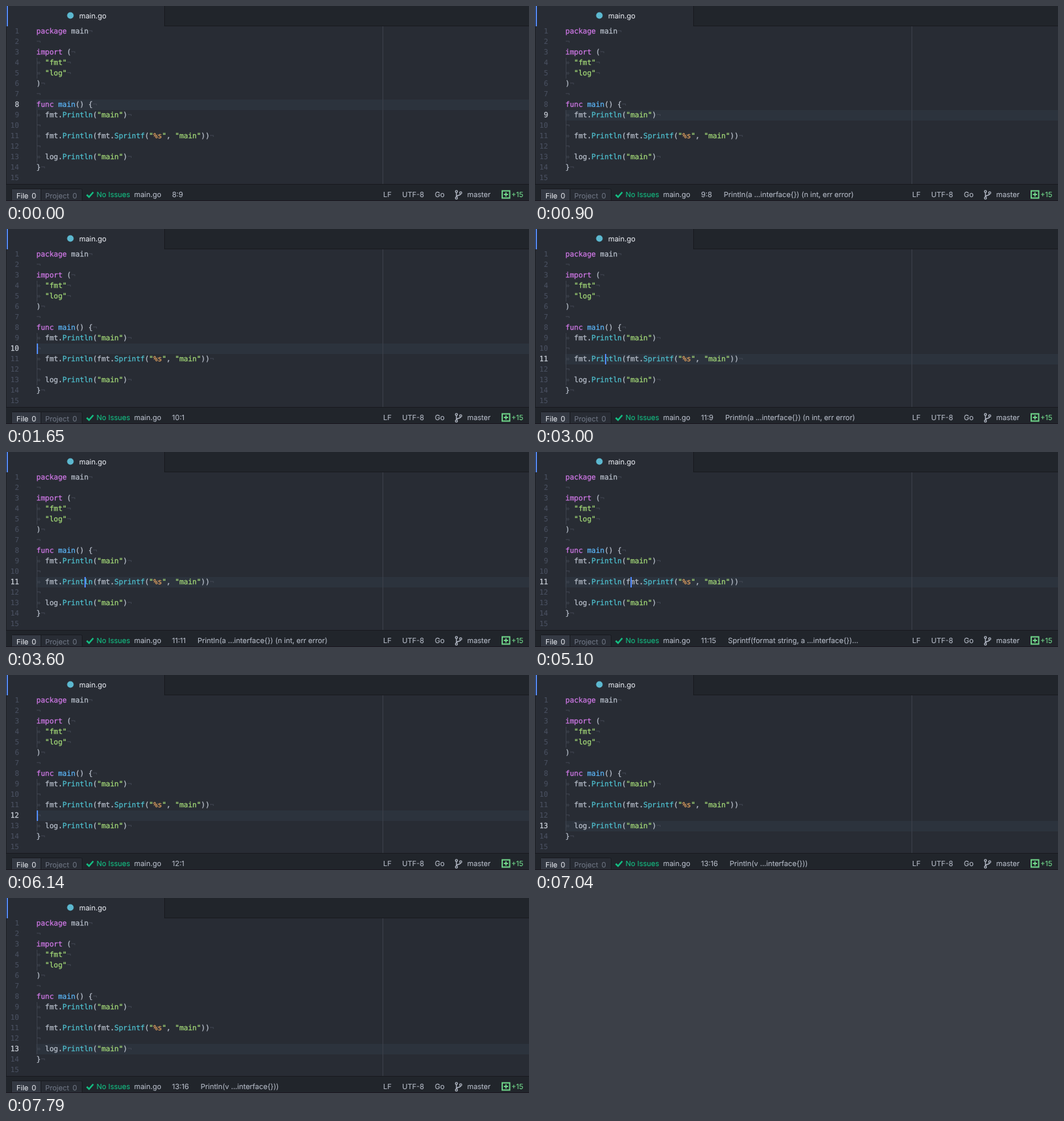
An HTML page that plays this animation: 800x298 px, repeating every 8 s.

```html
<!DOCTYPE html>
<html lang="en">
<head>
<meta charset="utf-8">
<title>Editor</title>
<style>
  html, body { margin: 0; width: 100%; height: 100%; overflow: hidden; background: #282c34; }
  svg { display: block; }
  text, tspan { fill: currentColor; stroke: currentColor; }
  text { white-space: pre; text-rendering: geometricPrecision; }
  .code text { font: 11px "DejaVu Sans Mono", monospace; color: #b9c0cc; stroke-width: .25; }
  .code .num { color: #495060; text-anchor: end; stroke-width: .1; }
  .code .num.on { color: #c8cdd6; stroke-width: .25; }
  .ui text { font: 11px Inter, sans-serif; color: #b0b6c2; stroke-width: .12; }
  .ui .lit { color: #dcdfe5; }
  .ui .dim { color: #6c7380; }
  .ui .ok { color: #14bd82; }
  .ui .add { color: #70d68a; }
  .code .k { color: #d179e8; }
  .code .f { color: #5bb5f7; }
  .code .c { color: #4fc1d0; }
  .code .s { color: #a5db78; }
  .code .o { color: #e5a360; }
  .code .i { color: #434955; stroke: none; }
</style>
</head>
<body>
<svg width="800" height="298" viewBox="0 0 800 298">
  <rect width="800" height="298" fill="#282c34"/>

  <g class="ui">
    <rect x="242" width="558" height="31" fill="#21252b"/>
    <rect x="242" width="1" height="31" fill="#181a1f"/>
    <rect x="242" y="30" width="558" height="1" fill="#181a1f"/>
    <rect width="1" height="273" fill="#1d2025"/>
    <rect x="1" width="2" height="31" fill="#568af2"/>
    <circle cx="98.5" cy="14.5" r="5" fill="#5cb8cf"/>
    <text class="lit" x="112" y="19">main.go</text>
  </g>

  <rect id="row" x="46" width="754" height="16" fill="#2c333d"/>
  <rect x="576" y="31" width="1" height="242" fill="#3c414b"/>
  <g fill="#3b404a">
    <rect x="47" y="79" width="1" height="32"/>
    <rect x="47" y="159" width="1" height="80"/>
  </g>
  <g class="code" id="code"></g>
  <g id="match" fill="#528bff">
    <rect x="133" y="206" width="7" height="1"/>
    <rect x="305" y="206" width="7" height="1"/>
  </g>
  <rect id="caret" width="2" height="16" fill="#528bff"/>

  <g class="ui">
    <rect y="273" width="800" height="25" fill="#21252b"/>
    <rect y="272" width="800" height="1" fill="#181a1f"/>
    <rect x="8.5" y="279.5" width="108" height="20" rx="2" fill="#282c34" stroke="#181a1f"/>
    <rect x="9" y="280" width="44" height="18" fill="#343943"/>
    <rect x="53" y="280" width="1" height="18" fill="#181a1f"/>
    <rect y="297" width="800" height="1" fill="#1b1720"/>
    <text class="lit" x="16" y="294">File <tspan dx="2">0</tspan></text>
    <text class="dim" x="60" y="294">Project <tspan dx="2">0</tspan></text>
    <path d="M123.5 288.5l3.5 3.5 6.5-7.5" fill="none" stroke="#14bd82" stroke-width="2.5"/>
    <text class="ok" x="138.5" y="292">No Issues</text>
    <text x="196" y="292">main.go</text>
    <text id="pos" x="254" y="292"></text>
    <text id="sig" y="292"></text>
    <text x="577" y="292">LF</text>
    <text x="606" y="292">UTF-8</text>
    <text x="656" y="292">Go</text>
    <g fill="none" stroke="#b0b6c2" stroke-width="1.4">
      <circle cx="689" cy="283.5" r="1.6"/>
      <circle cx="689" cy="293.5" r="1.6"/>
      <circle cx="695.5" cy="285.5" r="1.6"/>
      <path d="M689 285v7M695.5 287c0 3-6.5 1.5-6.5 5"/>
    </g>
    <text x="705.5" y="292">master</text>
    <path d="M759 282.5h11.5v11h-11.5zM761.5 288h6.5M764.75 284.8v6.4" fill="none" stroke="#70d68a" stroke-width="1.9"/>
    <text class="add" x="773" y="292">+15</text>
  </g>
</svg>
<script>
const LOOP = 8000, LEFT = 47, TOP = 31, LINE = 16, CHAR = 6.622;
const $ = id => document.getElementById(id);

// Each line is a list of [style, text] pairs.
const eol = ["i", "¬"], tab = ["i", "» "];
const call = (pkg, fn) => [["", pkg + "."], ["c", fn], ["", "("]];
const str = s => ["s", `"${s}"`];
const lines = [
  [["k", "package"], ["", " main"], eol],
  [eol],
  [["k", "import"], ["", " ("], eol],
  [tab, str("fmt"), eol],
  [tab, str("log"), eol],
  [["", ")"], eol],
  [eol],
  [["k", "func"], ["f", " main"], ["", "() {"], eol],
  [tab, ...call("fmt", "Println"), str("main"), ["", ")"], eol],
  [eol],
  [tab, ...call("fmt", "Println"), ...call("fmt", "Sprintf"),
    ["s", '"'], ["o", "%s"], ["s", '"'], ["", ", "], str("main"), ["", "))"], eol],
  [eol],
  [tab, ...call("log", "Println"), str("main"), ["", ")"], eol],
  [["", "}"], eol],
  []
];

function add(parent, tag, cls, text = "", at = {}) {
  const el = document.createElementNS("http://www.w3.org/2000/svg", tag);
  if (cls) el.setAttribute("class", cls);
  for (const k in at) el.setAttribute(k, at[k]);
  el.textContent = text;
  return parent.appendChild(el);
}

const nums = lines.map((parts, i) => {
  const y = TOP + i * LINE + 11;
  const text = add($("code"), "text", "", "", { x: LEFT - 0.4, y });
  parts.forEach(([cls, s]) => add(text, "tspan", cls, s));
  return add($("code"), "text", "num", i + 1, { x: 20, y });
});

const print = "Println(a ...interface{}) (n int, err error)";
const format = "Sprintf(format string, a ...interface{})…";
const log = "Println(v ...interface{}))";

// Caret stops: start time, line, visual column, signature.
const stops = [
  [0, 8, 9, ""],
  [450, 9, 9, print],
  [1650, 10, 1, ""],
  [2250, 11, 9, print],
  [3000, 11, 10, print],
  [3450, 11, 11, print],
  [3600, 11, 12, print],
  [3750, 11, 13, print],
  [3900, 11, 14, print],
  [4200, 11, 15, print],
  [5100, 11, 16, format],
  [5250, 11, 17, format],
  [6140, 12, 1, ""],
  [6440, 13, 17, log]
];
// Spans in which the blinking caret is hidden.
const hidden = [[0, 300], [900, 1350], [2100, 2250], [2700, 3000],
  [4650, 5100], [5840, 6140], [7040, 7340], [7790, LOOP]];

let shown = null;
function place(stop) {
  const [, line, col, sig] = stop;
  const y = TOP + (line - 1) * LINE;
  $("row").setAttribute("y", y);
  $("caret").setAttribute("y", y);
  $("caret").setAttribute("x", Math.round(LEFT + (col - 1) * CHAR));
  nums.forEach((n, i) => n.classList.toggle("on", i + 1 === line));
  // A tab takes two cells but counts as one column.
  const tabbed = lines[line - 1][0] === tab;
  $("pos").textContent = line + ":" + (tabbed ? col - 1 : col);
  $("sig").textContent = sig;
  $("sig").setAttribute("x", 254 + $("pos").getComputedTextLength() + 18);
  $("match").style.display = line === 11 && (col === 14 || col === 15) ? "" : "none";
}

function draw(now) {
  const t = now % LOOP;
  const stop = stops.filter(s => s[0] <= t).pop();
  if (stop !== shown) place(shown = stop);
  const off = hidden.some(([a, b]) => t >= a && t < b);
  $("caret").style.display = off ? "none" : "";
  requestAnimationFrame(draw);
}
draw(performance.now());
</script>
</body>
</html>
```
